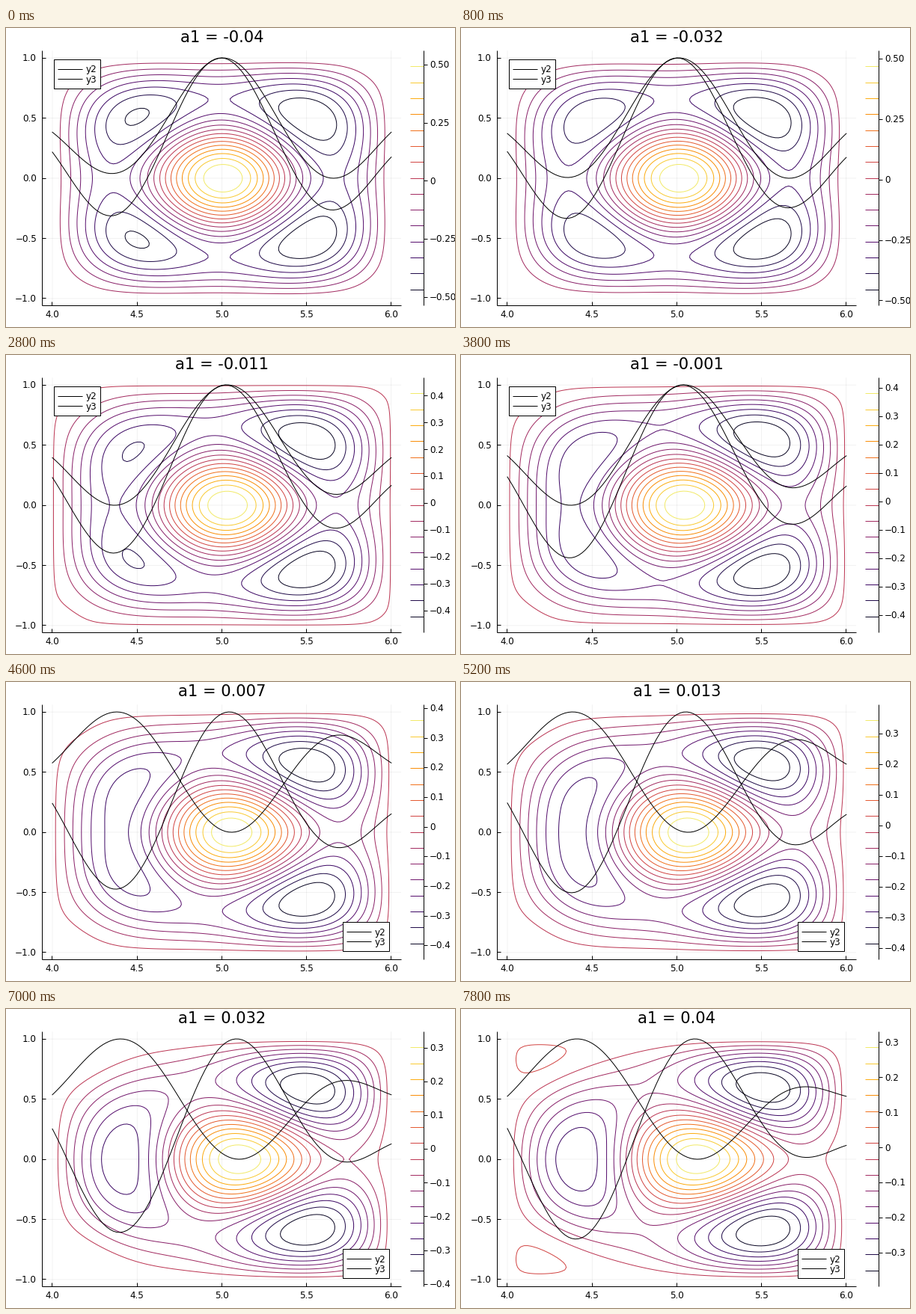
A matplotlib script for the animation above (8000 ms loop, 600 px wide and 400 px high).

```python
import numpy as np
import matplotlib.pyplot as plt
from matplotlib.animation import FuncAnimation

plt.rcParams["font.family"] = "DejaVu Sans"

W, H, DPI = 600, 400, 100
PX = 72 / DPI                      # points per pixel
FRAMES, INTERVAL = 40, 200
LEFT, RIGHT, TOP, BOTTOM = 48.4, 528.4, 30.4, 371.6
BAR_L, BAR_R = 540, 558.5
KAPPA, SHIFT = 31.0, 0.1
LEVELS = 15

# Flux on a rectangle, zero on the boundary:
#   u_RR - u_R / R + u_yy = a1 R^2 - KAPPA (u + SHIFT)
N = 101
R = np.linspace(4, 6, N)
Y = np.linspace(-1, 1, N)


def solve_basis():
    """Five-point responses to a unit force and to R^2, by cosine modes in y."""
    h = R[1] - R[0]
    r = R[1:-1]
    eye, up, down = np.eye(N - 2), np.eye(N - 2, k=1), np.eye(N - 2, k=-1)
    op = (up + down - 2 * eye) / h**2 - (up - down) / (2 * h * r[:, None])
    force = np.column_stack([np.ones(N - 2), r**2])
    out = np.zeros((2, N, N))
    for n in range(1, N - 1, 2):
        k = n * np.pi / 2
        mode = np.cos(k * Y)
        amp = h * mode[1:-1].sum()
        eig = (2 / h * np.sin(k * h / 2))**2
        part = np.linalg.solve(op + (KAPPA - eig) * eye, -amp * force)
        out[:, :, 1:-1] += mode[None, :, None] * part.T[:, None, :]
    return out


UNIT, SQUARE = solve_basis()

fig = plt.figure(figsize=(W / DPI, H / DPI), dpi=DPI, facecolor="white")
ax = fig.add_axes([LEFT / W, 1 - BOTTOM / H, (RIGHT - LEFT) / W, (BOTTOM - TOP) / H])
ax.set(xlim=(3.94, 6.06), ylim=(-1.06, 1.06))
ax.axis("off")
page = fig.add_axes([0, 0, 1, 1])
page.set(xlim=(0, W), ylim=(H, 0))
page.axis("off")


def line(x, y, color="black", z=2):
    # half a pixel back, so that snapping keeps the pixel the point lies in
    return page.plot(np.subtract(x, 0.5), np.subtract(y, 0.5), color=color,
                     lw=PX, zorder=z, solid_capstyle="butt")[0]


def label(x, y, s, size=12, ha="center", z=4):
    return page.text(x, y, s, fontsize=size * PX, ha=ha, va="baseline", zorder=z)


def number(v, digits):
    return f"{v:.{digits}f}".replace("-", "\u2212")


def x_px(v):
    return LEFT + (v - 3.94) / 2.12 * (RIGHT - LEFT)


def y_px(v):
    return TOP + (1.06 - v) / 2.12 * (BOTTOM - TOP)


# axes, grid and tick labels
grid = dict(color="black", alpha=0.1, lw=0.5 * PX, zorder=0, snap=False)
line([LEFT, LEFT], [TOP, BOTTOM])
line([LEFT, RIGHT], [BOTTOM, BOTTOM])
for v in np.arange(4, 6.1, 0.5):
    ax.axvline(v, **grid)
    line([x_px(v)] * 2, [BOTTOM, BOTTOM - 5])
    label(x_px(v), 387.4, number(v, 1))
for v in np.arange(-1, 1.1, 0.5):
    ax.axhline(v, **grid)
    line([LEFT, LEFT + 5], [y_px(v)] * 2)
    label(41, y_px(v) + 4.2, number(v, 1), ha="right")

# colour bar
colors = plt.get_cmap("inferno")(np.arange(1, LEVELS + 1) / (LEVELS + 1))
line([BAR_R, BAR_R], [TOP, BOTTOM])
for i, c in enumerate(colors, 1):
    y = BOTTOM - (BOTTOM - TOP) * i / (LEVELS + 1)
    line([BAR_L, BAR_R], [y, y], c, 1)

title = label((LEFT + RIGHT) / 2, 19, "", 21)
curves = [ax.plot(R, 0 * R, color="black", lw=PX, zorder=3)[0] for _ in range(2)]
moving = []


def draw_legend(x, y):
    box = plt.Rectangle((x, y), 61.8, 39, fc="white", ec="black", lw=PX, zorder=3)
    moving.append(page.add_patch(box))
    for i, name in enumerate(("y2", "y3")):
        row = y + 13 + 13.4 * i
        moving.append(line([x + 5.5, x + 38], [row, row], z=4))
        moving.append(label(x + 42.5, row + 4.2, name, ha="left"))


def draw_bar_ticks(lo, hi):
    step, digits = (0.1, 1) if max(hi, -lo) < 0.5 else (0.25, 2)
    for k in range(int(np.ceil(lo / step)), int(np.floor(hi / step)) + 1):
        y = BOTTOM - (k * step - lo) / (hi - lo) * (BOTTOM - TOP)
        moving.append(line([BAR_R, BAR_R + 5], [y, y]))
        text = number(k * step, digits) if k else "0"
        moving.append(label(566, y + 3.7, text, ha="left"))


def draw(i):
    while moving:
        moving.pop().remove()
    a1 = -0.04 + 0.08 * i / (FRAMES - 1)
    u = KAPPA * SHIFT * UNIT - a1 * SQUARE
    lo, hi = u.min(), u.max()
    levels = np.linspace(lo, hi, LEVELS + 2)[1:-1]
    moving.append(ax.contour(R, Y, u, levels=levels, colors=colors,
                             linewidths=PX, linestyles="solid", zorder=1))

    mid = u[N // 2]
    pressure = -a1 * mid
    current = (KAPPA * (mid + SHIFT) - a1 * R**2) / R
    curves[0].set_ydata((pressure - pressure.min()) / np.ptp(pressure))
    curves[1].set_ydata(current / current.max())

    title.set_text(f"a1 = {round(a1, 3)}")
    draw_bar_ticks(lo, hi)
    draw_legend(*((64, 42) if a1 < 0 else (450.2, 321.3)))
    return []


anim = FuncAnimation(fig, draw, frames=FRAMES, interval=INTERVAL,
                     init_func=lambda: [], repeat=True, repeat_delay=0)
plt.show()
```
